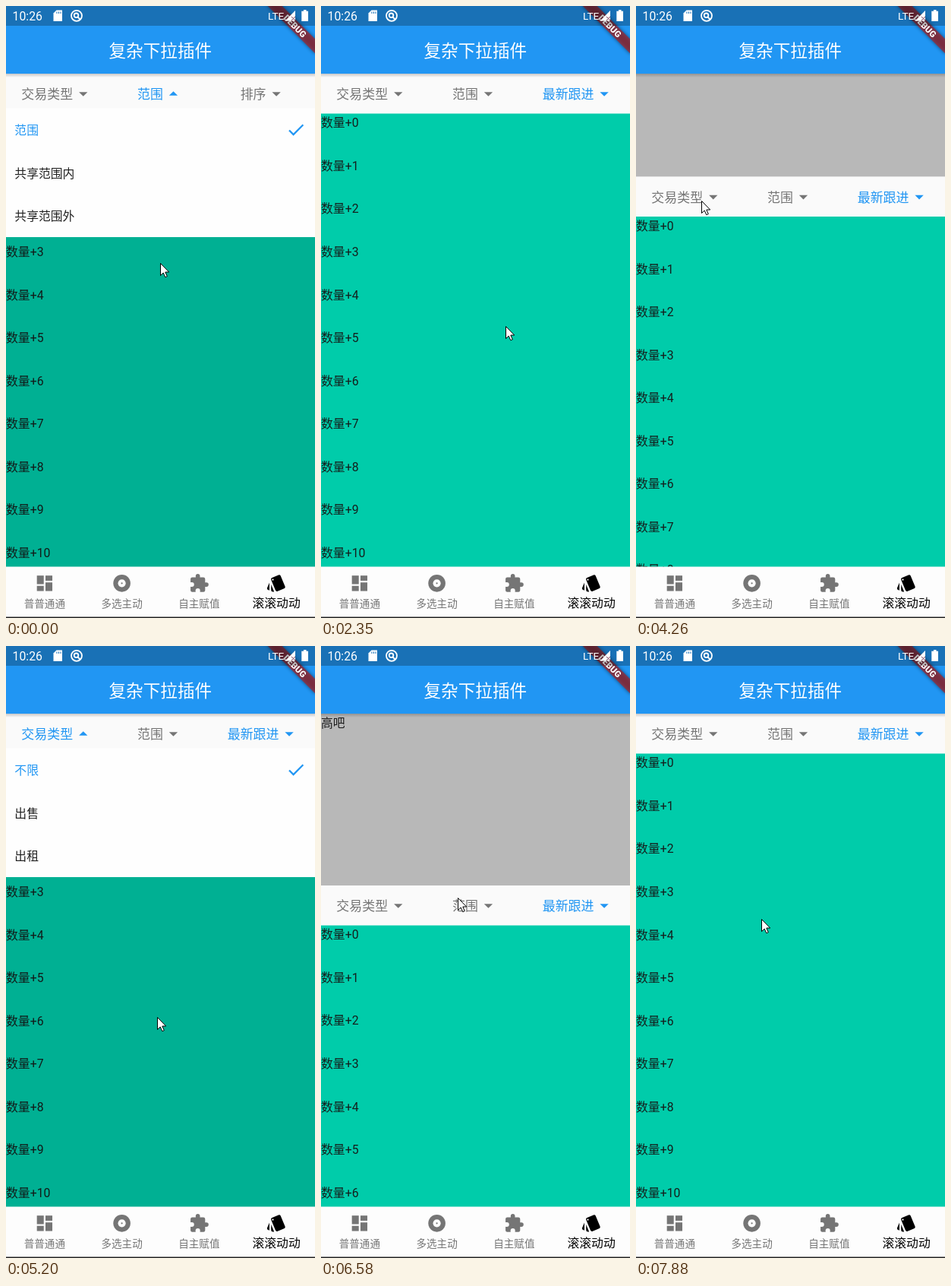
An HTML page for the animation above (8 s loop, 407 by 805 pixels).

```html
<!DOCTYPE html>
<html lang="zh-CN">
<head>
<meta charset="utf-8">
<style>
html, body { margin: 0; width: 100%; height: 100%; overflow: hidden; background: #fafafa; }
svg { display: block; width: 407px; height: 805px; font-family: Roboto, "Noto Sans CJK SC", "Noto Sans CJK", sans-serif; }
</style>
</head>
<body>
<svg viewBox="0 0 407 805">
  <defs>
    <clipPath id="menuClip"><rect y="134" width="407" height="604"/></clipPath>
    <linearGradient id="shade" x2="0" y2="1">
      <stop offset="0" stop-color="#000" stop-opacity=".2"/>
      <stop offset="1" stop-color="#000" stop-opacity="0"/>
    </linearGradient>
    <filter id="soft" x="-20%" y="-60%" width="140%" height="220%"><feGaussianBlur stdDeviation="2.6"/></filter>
  </defs>
  <rect width="407" height="805" fill="#fafafa"/>

  <g id="page">
    <rect y="-137" width="407" height="226" fill="#b8b8b8"/>
    <text y="-119" font-size="15.83" fill="#1c1c1c">高吧</text>
    <rect y="141.3" width="407" height="700" fill="#00ccaa"/>
    <g id="rows" font-size="15.83" fill="#14201e"></g>
    <g id="tabs" font-size="16.96"></g>
  </g>
  <rect id="mask" y="141.3" width="407" height="597"/>
  <g clip-path="url(#menuClip)"><g id="menu" font-size="15.83"></g></g>

  <rect y="89" width="407" height="5" fill="url(#shade)"/>
  <rect width="407" height="89" fill="#2196f3"/>
  <text x="203.3" y="66.6" font-size="22.6" fill="#fff" text-anchor="middle">复杂下拉插件</text>

  <g transform="translate(407 0) rotate(45)">
    <rect x="-45" y="30.6" width="90" height="13.4" opacity=".5" filter="url(#soft)"/>
    <rect x="-45" y="30.6" width="90" height="13.4" fill="#b71c1c" opacity=".63"/>
    <text y="41.4" font-size="11.5" font-weight="900" fill="#fff" text-anchor="middle">DEBUG</text>
  </g>
  <rect width="407" height="26" opacity=".25"/>
  <g fill="#fff">
    <text x="8.6" y="18.6" font-size="15.8">10:26</text>
    <path d="M66.5 5.5H74V20H62.500V9.500Z"/>
    <path d="M67 7.500v2.500m2.500-2.500v2.500m2.500-2.500v2.500" stroke="#1971b6"/>
    <g fill="none" stroke="#fff" stroke-width="1.8">
      <circle cx="93" cy="12.800" r="7"/><circle cx="92.500" cy="12.300" r="2.800"/><path d="M94.500 14.500l3.500 3.500"/>
    </g>
    <text x="345" y="17.8" font-size="13.6">LTE</text>
    <path d="M381 6V19.500H367.500Z"/>
    <path d="M376 14l5 5m0-5l-5 5" stroke="#7a3c58"/>
    <rect x="389.300" y="6.700" width="8.700" height="13.300"/><rect x="392" y="5" width="3.500" height="3"/>
  </g>

  <rect y="737.5" width="407" height="68" fill="#fdfdfd"/>
  <g id="nav"></g>
  <rect y="803.5" width="407" height="1.5" fill="#222"/>
  <path id="cursor" d="M.5 .5V16.500L4.200 13 6.800 18.700 9.300 17.600 6.800 12H11.700Z" fill="#fff" stroke="#000"/>
</svg>
<script>
const $ = id => document.getElementById(id);
const LOOP = 8000, W = 407, BLUE = '#2196f3', GREY = '#757575', INK = '#212121', PAPER = '#fdfdfd';
const ROW = 56.53, MENU_TOP = 134.4, LIST_TOP = 141, PULL = 226;

const box = (x, y, w, h, r = 0, more = '') =>
  `<rect x="${x}" y="${y}" width="${w}" height="${h}" rx="${r}" ${more}/>`;
const dot = (x, y, r, fill) => `<circle cx="${x}" cy="${y}" r="${r}" fill="${fill}"/>`;
const hole = `fill="${PAPER}"`;

// icons on a 24 unit grid
const icons = {
  board: box(3, 3, 8, 10) + box(3, 15, 8, 6) + box(13, 11, 8, 10) + box(13, 3, 8, 6),
  disc: dot(12, 12, 10, GREY) + dot(12, 12, 4.5, PAPER) + dot(12, 12, 1, GREY),
  puzzle: box(2, 5, 17, 17, 2) + box(8, 1, 5, 6, 2.5) + box(17, 11, 6, 5, 2.5) +
    box(0, 10.8, 6.2, 5.4, 2.7, hole) + box(7.8, 17.8, 5.4, 6.2, 2.7, hole),
  cards: box(-6, -8.5, 12, 17, 2, 'transform="translate(14 11.8) rotate(-22.5)"') + dot(7.9, 7.8, 1, PAPER) +
    '<path d="M3.900 20.200V11.200L1.400 17q-.7 2 1.100 2.700zM5.900 19.800q0 2 2 2h1.500L5.900 13.400z"/>',
  check: '<path d="M4.100 12.700L9 17.600 20.300 6.300" fill="none" stroke="#2196f3" stroke-width="2"/>'
};
const icon = (name, x, y, fill) =>
  `<g transform="translate(${x} ${y}) scale(1.13)" fill="${fill}">${icons[name]}</g>`;

$('nav').innerHTML = Object.entries({ board: '普普通通', disc: '多选主动', puzzle: '自主赋值', cards: '滚滚动动' })
  .map(([name, label], i) => {
    const on = i === 3, x = W * (i + .5) / 4, fill = on ? '#000' : GREY;
    return icon(name, x - 13.57, 745.8, fill) +
      `<text x="${x}" y="791.3" font-size="${on ? 15.83 : 13.57}" fill="${fill}" text-anchor="middle">${label}</text>`;
  }).join('');

$('rows').innerHTML = Array.from({ length: 11 }, (_, i) =>
  `<text y="${LIST_TOP + 18.4 + i * ROW}">数量+${i}</text>`).join('');

const options = [
  ['不限', '出售', '出租'],
  ['范围', '共享范围内', '共享范围外'],
  ['排序', '最新跟进', '最新录入', '面积从高到低', '面积从低到高']
];
const PICK = 1800;
const visits = [
  { col: 1, open: -300, close: 120 },
  { col: 2, open: 1140, close: PICK },
  { col: 0, open: 4840, close: 5250 },
  { col: 1, open: 7100, close: 7560 }
];

// time, x, y of the pointer's stops
const stops = [
  [120, 203, 338], [670, 341, 118], [950, 341, 129], [1260, 318, 208], [2350, 243, 421], [2850, 262, 578],
  [3440, 268, 511], [4260, 86, 256], [5200, 199, 488], [6000, 204, 625], [6580, 180, 331], [7880, 165, 359]
];

const ramp = (t, a, b) => Math.max(0, Math.min(1, (t - a) / (b - a)));
const glide = (t, a, b) => { const p = ramp(t, a, b); return p * p * (3 - 2 * p); };

// drag down, drag part way up, jump to the top; then again
const scroll = t => PULL * (
  glide(t, 2400, 2900) - .4 * glide(t, 3560, 4000) - .6 * glide(t, 4480, 4840) +
  glide(t, 5700, 6300) - glide(t, 6750, 7100));

function pointer(t) {
  let [, x, y] = stops[0];
  for (let i = 1; i < stops.length; i++) {
    const [from, x0, y0] = stops[i - 1], [to, x1, y1] = stops[i];
    const p = glide(t, from, to);
    x += (x1 - x0) * p;
    y += (y1 - y0) * p;
  }
  return `translate(${Math.round(x)} ${Math.round(y)})`;
}

function tab(label, col, on, up) {
  const w = label.length * 16.96, x = W * (col + .5) / 3 - (w + 27.1) / 2;
  const left = x + w + 7.9, fill = on ? BLUE : GREY;
  const y = up ? 117.8 : 113.2, rise = up ? -5.65 : 5.65;
  return `<text x="${x}" y="122" fill="${fill}">${label}</text>` +
    `<path d="M${left} ${y}h11.3l-5.65 ${rise}z" fill="${fill}"/>`;
}

function menuBody(col, reveal, picked) {
  const list = options[col], height = list.length * ROW;
  const top = MENU_TOP + height * (reveal - 1);
  return box(0, top, W, height, 0, 'fill="#fefefe"') + list.map((label, i) => {
    const y = top + i * ROW, on = i === picked;
    return `<text x="11.3" y="${y + 35}" fill="${on ? BLUE : INK}">${label}</text>` +
      (on ? icon('check', 368.4, y + 14.8, BLUE) : '');
  }).join('');
}

function draw(t) {
  const sorted = t >= PICK;
  const visit = visits.find(v => t >= v.open && t < v.close + 250);
  const open = visit ? ramp(t, visit.open, visit.open + 300) * (1 - ramp(t, visit.close, visit.close + 250)) : 0;
  const active = visit && t < visit.close ? visit.col : -1;

  $('tabs').innerHTML = box(0, 89, W, 52.3, 0, 'fill="#fafafa"') +
    ['交易类型', '范围', sorted ? '最新跟进' : '排序'].map((label, i) =>
      tab(label, i, i === active || (i === 2 && sorted), i === active)).join('');
  $('page').setAttribute('transform', `translate(0 ${scroll(t)})`);
  $('mask').setAttribute('opacity', .137 * open);
  $('menu').innerHTML = visit ? menuBody(visit.col, open ** 2.7, visit.col === 2 && sorted ? 1 : 0) : '';
  $('cursor').setAttribute('transform', pointer(t));
}

let began = null;
function tick(now) {
  if (began === null) began = now;
  draw((now - began) % LOOP);
  requestAnimationFrame(tick);
}
draw(0);
requestAnimationFrame(tick);
</script>
</body>
</html>
```
